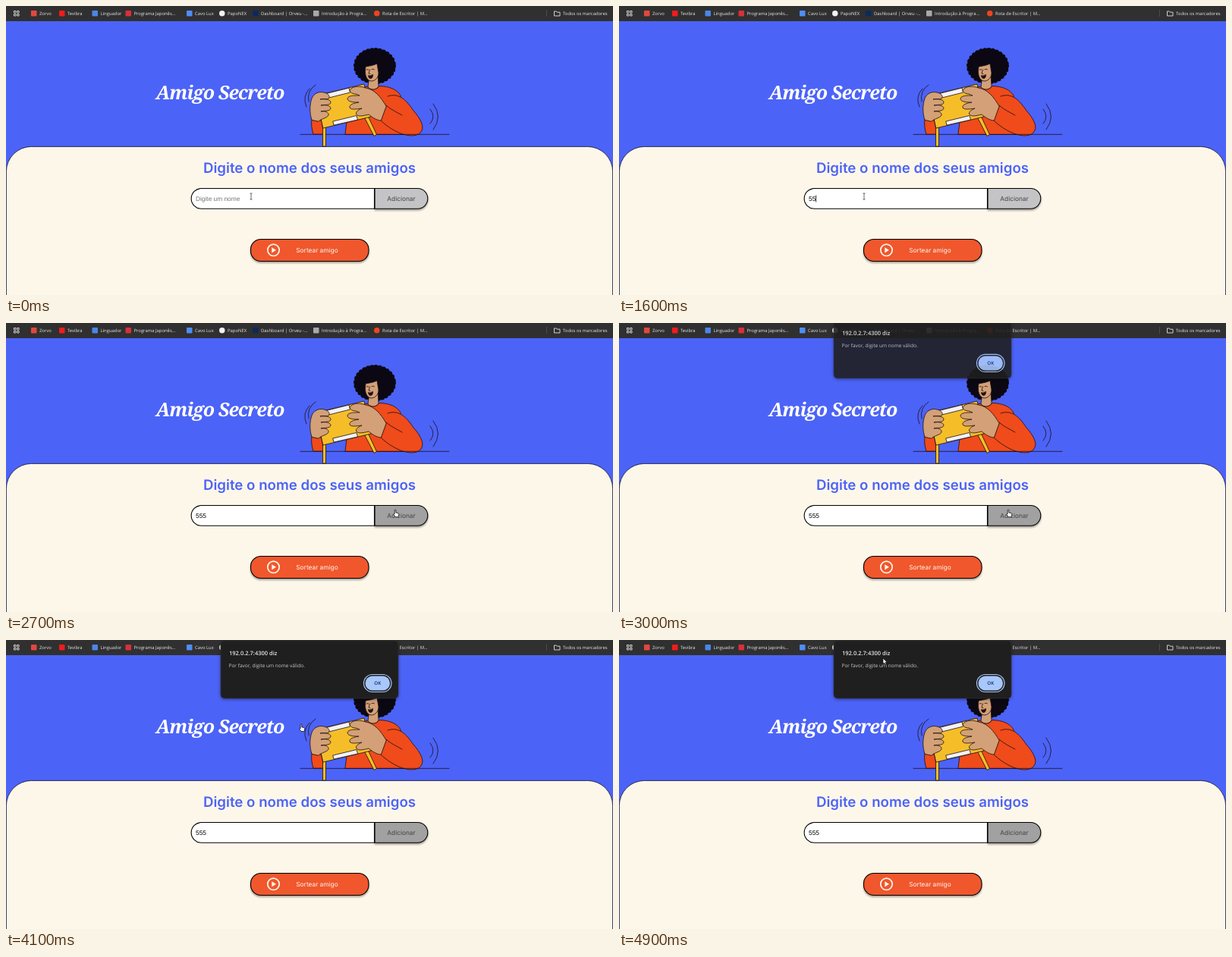
Animation of 800 by 381 pixels, one loop 5 s. Source, as an HTML page:

```html
<!DOCTYPE html>
<html lang="pt-BR">
<head>
<meta charset="utf-8">
<title>Amigo Secreto</title>
<style>
  html, body { margin: 0; width: 100%; height: 100%; overflow: hidden; background: #fdf7ea; }
  svg { display: block; width: 800px; height: 381px; }
  text { text-rendering: geometricPrecision; white-space: pre; }
  .bar { font: 5.9px "Open Sans", sans-serif; fill: #e6e6e6; }
  .logo { font: italic 700 25px "Noto Serif", serif; letter-spacing: -1px; fill: #fff; }
  .head { font: 600 18.7px Inter, sans-serif; fill: #4c63f7; }
  .field { font: 8.33px "Liberation Sans", Arial, sans-serif; }
  .btn { font: 8.33px Inter, sans-serif; }
  .mid { text-anchor: middle; }
  .box { stroke: #000; stroke-width: 1.1; }
  .raised { filter: drop-shadow(0 2px 1.2px rgba(0, 0, 0, .35)); }
  .art { stroke: #1b1012; stroke-width: .8; stroke-linejoin: round; stroke-linecap: round; }
  .skin { fill: #d3a077; }
  .knit { fill: #f04b1b; }
  .wood { fill: #f5be29; }
  .line { fill: none; }
</style>
</head>
<body>
<svg viewBox="0 0 800 381">
  <rect width="800" height="381" fill="#4c63f7"/>
  <rect x=".4" y="185.4" width="799.2" height="260" rx="33" fill="#fdf7ea" stroke="#15152e" stroke-width=".8"/>

  <!-- browser bar -->
  <rect width="800" height="20" fill="#303030"/>
  <g id="marks" class="bar">
    <path d="M10.5 6.5h2.4v2.4h-2.4zM14.7 6.5h2.4v2.4h-2.4zM10.5 10.6h2.4v2.4h-2.4zM14.7 10.6h2.4v2.4h-2.4zM722.5 7h2.8l1 1.2h3.7v4.8h-7.5z" fill="none" stroke="#e0e0e0" stroke-width=".9"/>
    <path d="M712.5 5v9" stroke="#555" stroke-width=".8"/>
    <text x="734" y="11.8">Todos os marcadores</text>
  </g>

  <text class="logo mid" x="282" y="122.5">Amigo Secreto</text>

  <!-- person shaking the stool -->
  <g class="art">
    <ellipse cx="486" cy="79" rx="24.5" ry="20.5" fill="#0b0814" stroke="#0b0814" stroke-width="7" stroke-dasharray="0 5.1"/>
    <path class="skin" d="M479 92L477 107C481 112 488 111 491 106L490 88Z"/>
    <path class="skin" d="M474 80C472 90 475 98 481 99C487 99 491 94 491 88L489 76C483 79 478 79 474 80Z"/>
    <path class="line" d="M475 84q1.5-1 3 0M482 83.5q2-1 3.5 .3M479.5 84l-1.5 5 2 .4"/>
    <path d="M477.5 92q3 .6 6-1.6q0 5-3 5.2q-2.5 0-3-3.6Z" fill="#2b0d10"/>
    <path class="knit" d="M447 169L450 145C455 120 462 110 476 106C481 112 488 111 492 105.5C506 106 515 110 520 118L525 169Z"/>
    <path class="knit" d="M503 119C520 113 530 128 537 138C546 148 551 158 548 164C544 173 531 172 520 168C508 163 499 156 493 150L501 131C508 137 515 140 522 144"/>
    <path class="line" d="M388 169.3H584"/>
    <path class="knit" d="M403 149L416 151L419 169H405C403 163 402 156 403 149Z"/>
    <path class="wood" d="M417.5 158V185H421.5V158ZM472 146L485 171.5L488.5 169.5L477 145Z"/>
    <path class="wood" d="M409 118L472 103L481 146L418 161Z"/>
    <path d="M422 115.5L452 108L453.5 114L423.5 121.5ZM431 152L462 144.5L463.5 150L432.5 157Z" fill="#f4f2f5"/>
    <path class="skin" d="M403 150C400 142 400 130 403 122C405 116 412 112 419 114C424 115 427 118 426 121C424 124 418 122 414 123C420 122 428 123 428 127C428 131 421 130 415 131C421 130 428 131 428 135C427 139 420 138 415 139C420 138 426 140 425 144C423 148 416 148 412 152Z"/>
    <path class="skin" d="M501 132C494 120 486 110 474 108C466 105 458 106 455 109C451 112 455 116 461 116L466 118C458 118 451 118 450 122C450 126 456 127 465 127C458 128 452 130 453 134C455 137 461 136 469 135C464 137 460 140 462 143C464 146 470 145 478 143C484 148 490 151 494 151Z"/>
    <path class="line" d="M400 109Q390 119 396 133M408 104Q396 112 399 126M559 136Q567 146 559 155M563 129Q576 146 563 163"/>
  </g>

  <text class="head mid" x="400" y="220">Digite o nome dos seus amigos</text>

  <g class="raised">
    <path id="add" class="box" d="M486 240.5H542.5a13.3 13.3 0 0 1 0 26.7H486Z"/>
  </g>
  <path class="box" d="M485.5 240.5H257.5a13.3 13.3 0 0 0 0 26.7H485.5Z" fill="#fff"/>
  <text class="btn mid" x="521" y="257" fill="#444">Adicionar</text>
  <text id="entry" class="field" x="250" y="257"></text>
  <path id="caret" d="M0 249.5v9" stroke="#000" stroke-width=".8"/>

  <g class="raised">
    <rect class="box" x="322.5" y="307.5" width="155.5" height="29" rx="13.5" fill="#f0572d"/>
  </g>
  <circle cx="352.5" cy="321.8" r="7.7" fill="none" stroke="#fff6ea" stroke-width="1.7"/>
  <path d="M350.3 318.2V325.4L356 321.8Z" fill="#fff6ea"/>
  <text class="btn mid" x="410" y="324.8" fill="#fff6ea">Sortear amigo</text>

  <g id="dialog">
    <rect x="283" y="1" width="234" height="76" rx="5" fill="#1f1f1f" stroke="#35353a" stroke-width=".6" style="filter:drop-shadow(0 1px 2px rgba(0,0,0,.4))"/>
    <g font-family="Open Sans, sans-serif" fill="#e6e6e6">
      <text x="294" y="20.3" font-size="7.5" font-weight="600">192.0.2.7:4300 diz</text>
      <text x="293.5" y="36" font-size="6.5" fill="#c9c9c9">Por favor, digite um nome válido.</text>
      <rect x="471.5" y="45.5" width="36.5" height="23" rx="11.5" fill="none" stroke="#a8c7fa" stroke-width="1.2"/>
      <rect x="473.5" y="47.5" width="32.5" height="19" rx="9.5" fill="#a8c7fa"/>
      <text class="mid" x="489.7" y="59.2" font-size="6.2" font-weight="600" fill="#0a2f6b">OK</text>
    </g>
  </g>

  <!-- pointers -->
  <path id="beam" d="M-1.5-4h3M0-4v8M-1.5 4h3" fill="none" stroke="#444" stroke-width=".8"/>
  <path id="hand" d="M-1.8-4.5q.9-1 1.7 0V-1l3 .7q1 .3 .9 1.5L3.2 4.7H-.8L-3.3 1.3q0-1.2 1.5-.4Z" fill="#fff" stroke="#111" stroke-width=".8" stroke-linejoin="round"/>
  <path id="arrow" d="M-1-4V3.5L.7 2L1.9 4.8L3.2 4.2L2 1.5H4.3Z" fill="#fff" stroke="#111" stroke-width=".7"/>
</svg>
<script>
const LOOP = 5000, STEP = 100;
const $ = id => document.getElementById(id);
const show = (id, on) => $(id).style.display = on ? '' : 'none';
const move = (id, x, y) => $(id).setAttribute('transform', `matrix(1 0 0 1 ${x} ${y})`);
const clamp = v => Math.min(1, Math.max(0, v));
const smooth = v => v * v * (3 - 2 * v);

// label x, icon colour, round icon, label
const marks = [
  [44, '#e2483d', 0, 'Zorvo'],
  [81, '#f01c1c', 0, 'Tevibra'],
  [124.5, '#4a86e8', 0, 'Linguador'],
  [168.5, '#d8303a', 0, 'Programa Japonês...'],
  [249, '#4f8df5', 0, 'Cavo Lux'],
  [292, '#f2f2f2', 1, 'PapoNEX'],
  [336, '#0b2b5c', 0, 'Dashboard | Orveu -...'],
  [416, '#a9a9a9', 0, 'Introdução à Progra...'],
  [496, '#ee4423', 1, 'Rota de Escritor | M...']
];
$('marks').insertAdjacentHTML('beforeend', marks.map(([x, color, round, label]) =>
  `<rect x="${x - 11}" y="6" width="7.5" height="7.5" rx="${round ? 3.75 : 1}" fill="${color}"/>
   <text x="${x}" y="11.8">${label}</text>`).join(''));

const keyTimes = [800, 1200, 1700];
// pointer stops: time, x, y
const stops = [[2200, 323, 251], [2650, 514, 251], [3150, 514, 251],
  [3600, 545, 194], [4500, 279, 60], [4900, 349, 28]];

function pointer(t) {
  if (t <= stops[0][0]) return stops[0].slice(1);
  for (let i = 1; i < stops.length; i++) {
    const [t0, x0, y0] = stops[i - 1], [t1, x1, y1] = stops[i];
    if (t <= t1) {
      const k = smooth((t - t0) / (t1 - t0));
      return [x0 + (x1 - x0) * k, y0 + (y1 - y0) * k];
    }
  }
  return stops[stops.length - 1].slice(1);
}

function draw(t) {
  const typed = keyTimes.filter(k => k <= t);
  const lastKey = typed.length ? typed[typed.length - 1] : -500;
  const entry = $('entry');
  entry.textContent = typed.length ? '5'.repeat(typed.length) : 'Digite um nome';
  entry.setAttribute('fill', typed.length ? '#000' : '#757575');
  move('caret', 250.4 + typed.length * 4.63, 0);
  show('caret', t < 2700 && Math.floor((t - lastKey) / 500) % 2 === 0);

  const [x, y] = pointer(t);
  const onButton = x > 486 || t > 2650;
  $('add').setAttribute('fill', onButton ? '#a1a1a1' : '#c4c4c6');

  const open = 1 - (1 - clamp((t - 2850) / 220)) ** 2;
  $('dialog').setAttribute('opacity', open);
  move('dialog', 0, -40 * (1 - open));

  const onDialog = open === 1 && x > 283 && x < 517 && y < 77;
  const shape = !onButton ? 'beam' : onDialog ? 'arrow' : 'hand';
  for (const id of ['beam', 'hand', 'arrow']) show(id, id === shape);
  move(shape, x, y);
}

const start = performance.now();
function tick() {
  const t = (performance.now() - start + 20) % LOOP;
  draw(Math.floor(t / STEP) * STEP);
  requestAnimationFrame(tick);
}
tick();
</script>
</body>
</html>
```
